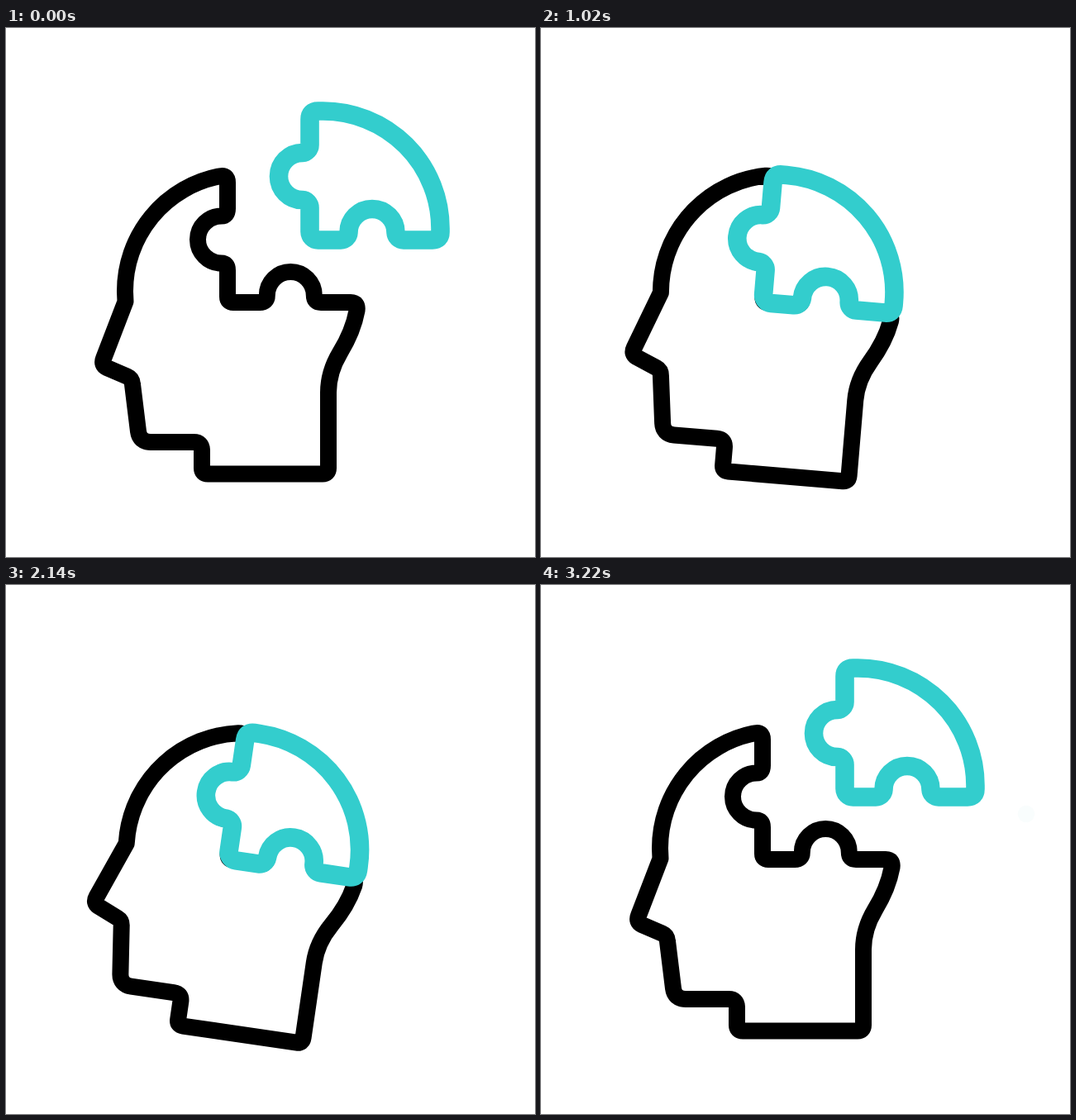
An HTML page for the animation above (3600 ms loop, 640x640 px).

```html
<!DOCTYPE html>
<html lang="en">
<head>
<meta charset="utf-8">
<title>Head puzzle</title>
<style>
  html, body { margin: 0; width: 100%; height: 100%; overflow: hidden; background: #fff; }
  svg { display: block; width: 100vw; height: 100vh; }
  path { fill: none; stroke-linecap: round; stroke-linejoin: round; }
  #head { stroke: #000; stroke-width: 20; }
  #piece { fill: #fff; stroke: #33cdcd; stroke-width: 22.6; }
  .line { stroke: #33cdcd; stroke-width: 20.5; }
</style>
</head>
<body>
<svg viewBox="0 0 640 640">
  <path id="head" d="M144 319A141.5 141.5 0 0 1 259 179.2Q268 177.500 268 187V218.500
    Q268 227.500 260.500 227.500A28.500 28.500 0 0 0 260.500 284.500Q268 284.500 268 293V325
    Q268 332 275 332H307Q315.800 332 315.800 323.500A28.500 28.500 0 0 1 372.800 323.500
    Q372.800 332 381 332H417Q426 332 424.500 342C421 361 415 375 404 393C395 408 390 422 390 441
    V532.500Q390 539.500 383 539.500H244Q237 539.500 237 532.500V511Q237 501 227 501H175
    C166 501 161 496 160 488L153 431Q152.500 424 147 421.700L122 411Q115 407.500 118 400L144.500 331Z"/>
  <g id="lines"></g>
  <path id="piece" d="M367.500 110.500Q367.500 100.500 377.500 100.500H383.500A142 142 0 0 1 525.500 242.500V247
    Q525.500 256.500 516 256.500H481A9.500 9.500 0 0 1 471.500 247.500A28.500 28.500 0 0 0 414.500 247.500
    A9.500 9.500 0 0 1 405 256.500H377.500A10 10 0 0 1 367.500 246.500V217.500A9.500 9.500 0 0 0 358.500 208
    A28.500 28.500 0 0 1 358.500 151A9.500 9.500 0 0 0 367.500 141.500Z"/>
</svg>
<script>
const LOOP = 3600;
const $ = id => document.getElementById(id);
const clamp = x => Math.min(1, Math.max(0, x));
const mix = (a, b, k) => a + (b - a) * k;
const span = (t, from, to) => clamp((t - from) / (to - from));

// Cubic timing curve with control points (x1, 0) and (x2, 1)
const curve = (x1, x2) => x => {
  let lo = 0, hi = 1, u = x;
  for (let i = 0; i < 24; i++) {
    u = (lo + hi) / 2;
    const at = 3 * x1 * u * (1 - u) ** 2 + 3 * x2 * u * u * (1 - u) + u ** 3;
    if (at < x) lo = u; else hi = u;
  }
  return u * u * (3 - 2 * u);
};
const swing = curve(.4, .05);
const pop = curve(.3, .1);
const smooth = x => x * x * (3 - 2 * x);
const easeIn = x => x * x;
const easeOut = x => 1 - (1 - x) ** 2;

// Each key: time, value, easing of the way towards it
function track(keys, t) {
  let value = keys[0][1];
  for (let i = 1; i < keys.length; i++) {
    const [from, a] = keys[i - 1], [to, b, ease] = keys[i];
    if (t >= from) value = mix(a, b, ease(span(t, from, to)));
  }
  return value;
}

const tilt = [[740, 0], [1320, 5.8, swing], [1800, -9.1, swing], [2280, 9, swing], [3220, 0, swing]];
const seat = [[260, 0], [440, -.2, smooth], [744, 1, easeIn], [2260, 1, smooth], [2900, 0, pop]];

// Strokes: start point, end point, tip times, tail times, fade times, opacity left over
const strokes = [
  { a: [440, 345], b: [583, 212], tip: [2240, 2485], tail: [2440, 3000], fade: [2840, 3000], rest: 0 },
  { a: [443, 415], b: [587, 277], tip: [2480, 3000], tail: [2560, 3220], fade: [2980, 3220], rest: .03 },
  ...[20, 45, 70].map(deg => {
    const c = Math.cos(deg * Math.PI / 180), s = Math.sin(deg * Math.PI / 180);
    const at = r => [285.5 + r * c, 319 - r * s];
    return { a: at(178), b: at(203), tip: [770, 900], tail: [840, 1020], fade: [960, 1020], rest: 0 };
  })
];
for (const s of strokes) {
  s.el = document.createElementNS("http://www.w3.org/2000/svg", "path");
  s.el.setAttribute("class", "line");
  $("lines").append(s.el);
}

function drawStroke(s, t) {
  const point = k => s.a.map((v, i) => mix(v, s.b[i], k).toFixed(2));
  const tip = easeOut(span(t, ...s.tip)), tail = easeOut(span(t, ...s.tail));
  s.el.setAttribute("d", `M${point(tail)}L${point(tip)}`);
  s.el.setAttribute("opacity", t > s.tip[0] ? mix(1, s.rest, span(t, ...s.fade)) : 0);
}

function draw(now) {
  const t = now % LOOP;
  const turn = `rotate(${track(tilt, t)} 270 330)`;
  const k = track(seat, t);
  $("head").setAttribute("transform", turn);
  $("piece").setAttribute("transform", `${turn} translate(${-99 * k} ${75.7 * k})`);
  strokes.forEach(s => drawStroke(s, t));
}

const start = performance.now();
function tick() {
  draw(performance.now() - start);
  requestAnimationFrame(tick);
}
tick();
</script>
</body>
</html>
```
